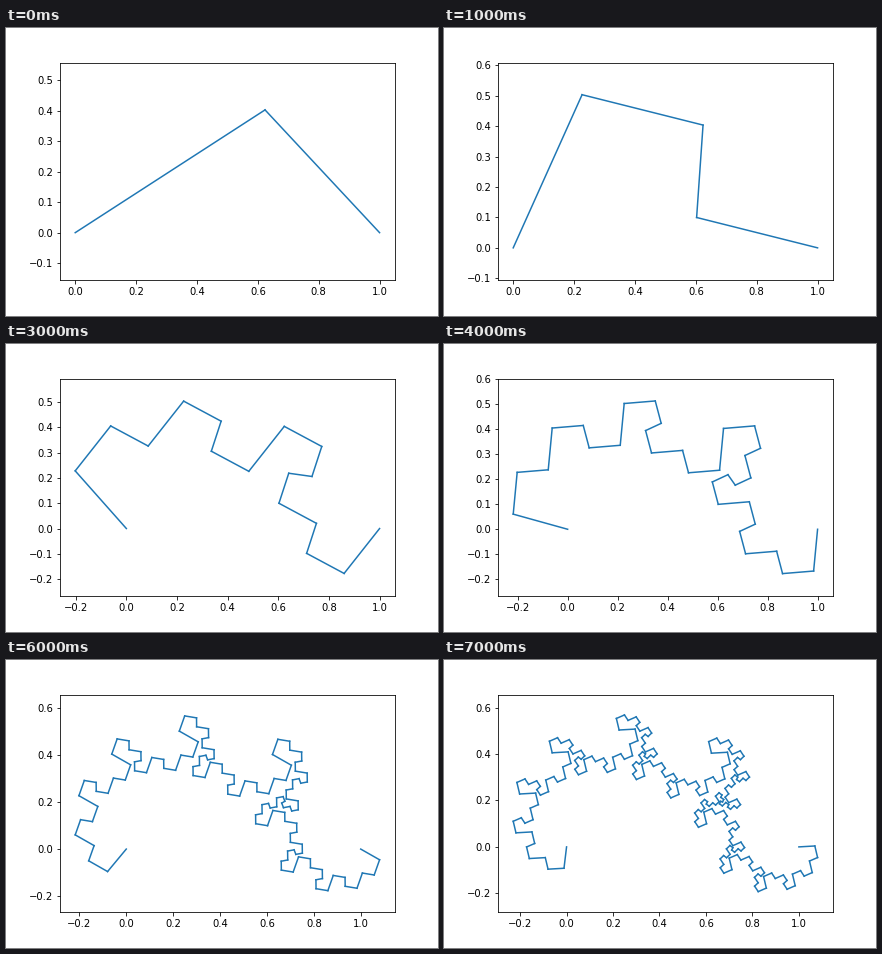
A matplotlib script for the animation above (8000 ms loop, 432 by 288 pixels).

```python
import math

import matplotlib.pyplot as plt
import numpy as np
from matplotlib.animation import FuncAnimation

STEPS = 8
STEP_MS = 1000

# Golden dragon: a triangle with sides 1, r and r**2 sets the fold point.
PHI = (1 + math.sqrt(5)) / 2
R = PHI ** (-1 / PHI)
COS_A = (1 + R**2 - R**4) / (2 * R)
FOLD = R * complex(COS_A, math.sqrt(1 - COS_A**2))

fig = plt.figure(figsize=(6, 4), dpi=72, facecolor="white")
fig.subplots_adjust(left=0.125, right=0.9, bottom=0.125, top=0.88)
ax = fig.add_subplot()


def dragon(depth):
    """Points of the curve from 0 to 1 as complex numbers."""
    pts = np.array([0, 1], dtype=complex)
    for _ in range(depth):
        tail = 1 - (1 - FOLD) * pts[::-1]
        pts = np.concatenate([FOLD * pts, tail[1:]])
    return pts


def draw(i):
    pts = dragon(i + 1)
    # One line per segment, so each keeps its own end caps.
    segments = np.array([pts[:-1], pts[1:]])
    ax.clear()
    ax.axis("equal")
    return ax.plot(segments.real, segments.imag, color="C0", lw=1.5)


anim = FuncAnimation(fig, draw, frames=STEPS, init_func=lambda: draw(0),
                     interval=STEP_MS, repeat=True, repeat_delay=0, blit=False)
plt.show()
```
